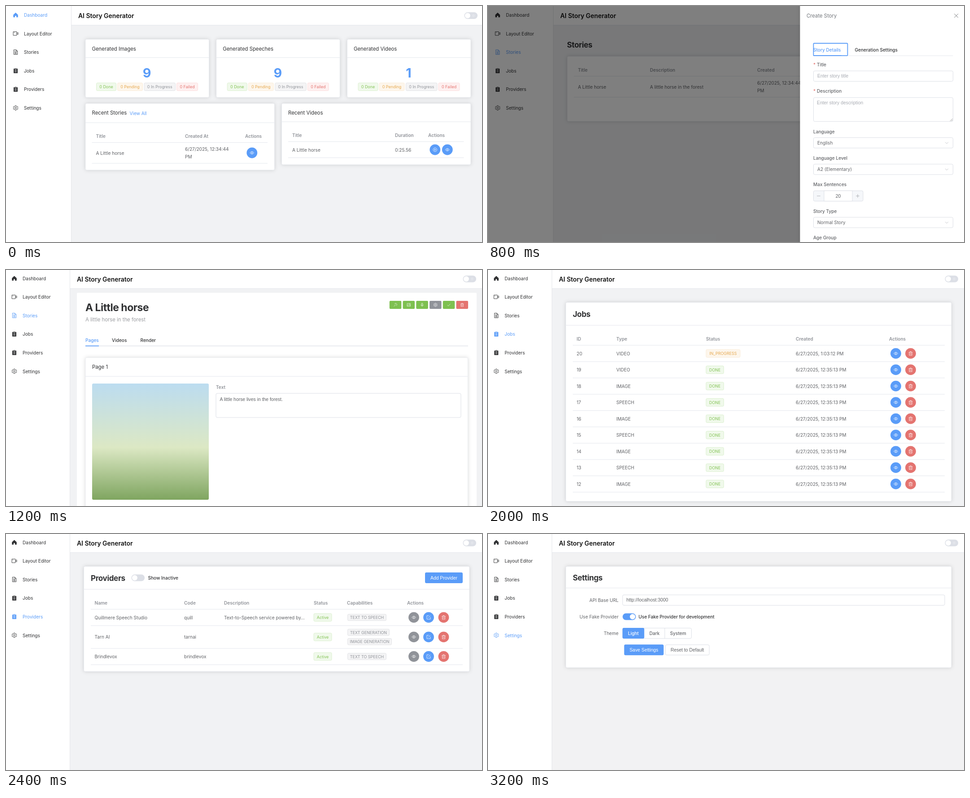
An HTML page that plays this animation: 1061x528 px, repeating every 3600 ms.

```html
<!DOCTYPE html>
<html lang="en">
<head>
<meta charset="utf-8">
<title>AI Story Generator</title>
<style>
html, body { margin: 0; width: 100%; height: 100%; overflow: hidden; background: #fff; }
svg#stage { display: block; width: 100%; height: 100%; }
.scene { visibility: hidden; animation: show 3600ms step-end infinite; }
@keyframes show { 0% { visibility: visible; } 11.1111%, 100% { visibility: hidden; } }
text { font: 10.1px Inter, sans-serif; fill: #606266; dominant-baseline: central; white-space: pre; }
.dark { fill: #303133; }
.title { font-size: 13.9px; font-weight: 600; fill: #111; }
.head { font-size: 11.35px; fill: #303133; }
.h2 { font-size: 17px; font-weight: 700; letter-spacing: -.02em; fill: #303133; }
.h1 { font-size: 22.9px; font-weight: 700; letter-spacing: -.02em; fill: #303133; }
.big { font-size: 28.8px; font-weight: 700; }
.th { font-weight: 600; fill: #909399; }
.med { font-weight: 500; }
.bold { font-weight: 700; font-size: 9.8px; fill: #111; }
.tag { font-size: 8.95px; }
.ui { font: 10.4px "Liberation Sans", Arial, sans-serif; }
.hint { fill: #a8abb2; }
.on { fill: #5a9cf8; }
.white { fill: #fff; }
.mid { text-anchor: middle; }
.end { text-anchor: end; }
.shadow { filter: drop-shadow(0 0 4.5px rgba(0,0,0,.14)); }
.icon { fill: none; stroke: currentColor; stroke-width: 1.2; stroke-linejoin: round; }
.solid { fill: currentColor; stroke: none; }
</style>
</head>
<body>
<svg id="stage" viewBox="0 0 1061 528">
  <defs>
    <linearGradient id="meadow" x2="0" y2="1">
      <stop offset="0" stop-color="#bcdcf0"/><stop offset=".55" stop-color="#dce8c4"/><stop offset="1" stop-color="#7fa560"/>
    </linearGradient>
  </defs>
</svg>
<script>
const BLUE = '#5a9cf8', GREEN = '#7ec050', RED = '#e47470', GREY = '#909399';
const LINE = '#e4e7ed', EDGE = '#dcdfe6';
const TAGS = {
  done: ['#f0f9eb', '#dcf0d0', '#84c356'],
  pending: ['#fdf6ec', '#faecd8', '#e6a950'],
  info: ['#f4f4f5', '#e2e3e6', GREY],
  failed: ['#fef0f0', '#fcdede', RED]
};
const ICONS = {
  home: '<path class="solid" d="M8 1 15 7.5V15H10V10.5H6V15H1V7.5Z"/>',
  camera: '<path d="M.8 2.5H11.2V13.5H.8ZM11.2 7 15.3 5V11L11.2 9M3 5.2H5"/>',
  doc: '<path d="M2.5 1H9.5L13.5 5V15H2.5ZM9.5 1V5H13.5M5 7.5H11M5 10H11M5 12.5H11M5 5H7"/>',
  clip: '<path class="solid" d="M2 2H5V.8H11V2H14V15.2H2Z"/><path stroke="#fff" d="M5 3.5H11M5 7.5H11M5 11H11"/>',
  gear: '<path d="M6.5 1.2H9.5L10 3.2 11.7 4.2 13.6 3.6 15.1 6.2 13.6 7.6V8.4L15.1 9.8 13.6 12.4 11.7 11.8 10 12.8 9.5 14.8H6.5L6 12.8 4.3 11.8 2.4 12.4.9 9.8 2.4 8.4V7.6L.9 6.2 2.4 3.6 4.3 4.2 6 3.2Z"/><circle cx="8" cy="8" r="2.4"/>',
  eye: '<path d="M1 8Q8-1 15 8 8 17 1 8Z"/><circle cx="8" cy="8" r="2.3"/>',
  play: '<circle cx="8" cy="8" r="6.6"/><path d="M6.4 5 11 8 6.4 11Z"/>',
  trash: '<path d="M1.5 4H14.5M6 4V1.8H10V4M3.2 4V14.5H12.8V4M6.4 7V11.5M9.6 7V11.5"/>',
  edit: '<path d="M9 2H2V14H14V7M6.5 9.5 14 2"/>',
  check: '<path d="M2 8.5 6 12.5 14 4"/>',
  tick: '<circle cx="8" cy="8" r="6.8"/><path d="M4.8 8 7.2 10.4 11.2 6"/>',
  plus: '<path d="M8 1.5V14.5M1.5 8H14.5"/>',
  minus: '<path d="M1.5 8H14.5"/>',
  save: '<path d="M8 1V11M3.5 7 8 11.3 12.5 7M2 14.5H14"/>',
  down: '<path d="M2 5 8 11 14 5"/>',
  up: '<path d="M2 11 8 5 14 11"/>',
  close: '<path d="M2 2 14 14M14 2 2 14"/>',
  picture: '<path d="M1.5 2.5H14.5V13.5H1.5ZM1.5 11.5 6 7.5 9 10.5 11.5 8.5 14.5 11"/><circle cx="10.5" cy="5.5" r="1"/>',
  mic: '<path d="M5.7 1.5H10.3V9H5.7ZM3 7.5Q3 11.8 8 11.8 13 11.8 13 7.5M8 12V15"/>',
  wand: '<path d="M2 14 9 7M5 5A4.6 4.6 0 1 1 11 11M8 1V2.5"/>',
  sun: '<circle cx="8" cy="8" r="3.4"/><path stroke-dasharray="1.5 3" d="M8 1.5A6.5 6.5 0 1 1 7.9 1.5"/>'
};

const text = (x, y, s, cls = '', fill = '') =>
  `<text x="${x}" y="${y}" class="${cls}"${fill && ` style="fill:${fill}"`}>${s}</text>`;
const box = (x, y, w, h, fill = '#fff', stroke = 'none', r = 3, extra = '') =>
  `<rect x="${x}" y="${y}" width="${w}" height="${h}" rx="${r}" fill="${fill}" stroke="${stroke}" ${extra}/>`;
const hline = (x1, x2, y, color = LINE, w = 1) => box(x1, y - w / 2, x2 - x1, w, color, 'none', 0);
const icon = (name, cx, cy, size, color) =>
  `<g class="icon" color="${color}" transform="translate(${cx - size / 2} ${cy - size / 2}) scale(${size / 16})">${ICONS[name]}</g>`;
const card = (x, y, w, h) => box(x, y, w, h, '#fff', LINE, 3, 'class="shadow" stroke-width=".7"');
const round = (name, cx, cy, fill = BLUE) =>
  `<circle cx="${cx}" cy="${cy}" r="11.9" fill="${fill}"/>` + icon(name, cx, cy, 10.4, '#fff');
const tag = (x, cy, w, kind, s, h = 17.4) => {
  const [fill, edge, ink] = TAGS[kind];
  return box(x, cy - h / 2, w, h, fill, edge, 2.5) + text(x + w / 2, cy, s, 'tag mid', ink);
};
const button = (x, y, w, h, fill, s = '') =>
  box(x, y, w, h, fill) + text(x + w / 2, y + h / 2, s, 'ui mid white');
const field = (x, y, w, h = 23.3, s = '', cls = 'ui') =>
  box(x, y, w, h, '#fff', EDGE) + text(x + 8.5, y + h / 2, s, cls);
const select = (x, y, w, s) => field(x, y, w, 23.3, s, '') + icon('down', x + w - 14, y + 11.8, 9, '#a8abb2');
const toggle = (x, cy, on) =>
  box(x, cy - 7.4, 29.6, 14.8, on ? BLUE : EDGE, 'none', 7.4) +
  `<circle cx="${x + (on ? 22.2 : 7.4)}" cy="${cy}" r="6" fill="#fff"/>`;
const heads = (y, cols) => cols.map(([x, s]) => text(x, y, s, 'th')).join('');
const lines = (x1, x2, ys) => ys.map(y => hline(x1, x2, y)).join('');

const NAV = [['home', 'Dashboard'], ['camera', 'Layout Editor'], ['doc', 'Stories'],
             ['clip', 'Jobs'], ['clip', 'Providers'], ['gear', 'Settings']];

function shell(active, shifted, back = '#f1f2f4') {
  const dx = shifted ? -3 : 0, dy = shifted ? -1.5 : 0;
  const nav = NAV.map(([name, label], i) => {
    const y = 20 + i * 41.6, on = label === active;
    return icon(name, 21.5, y, 12, on ? BLUE : '#303133') + text(40, y, label, on ? 'on' : 'dark');
  }).join('');
  return box(0, 0, 1061, 528, back, 'none', 0) + `<g transform="translate(${dx} ${dy})">` +
    box(-5, -5, 150, 540, '#fff', 'none', 0) + box(145, -5, 925, 47.5, '#fff', 'none', 0) +
    box(145, -5, 1, 540, '#e3e5e9', 'none', 0) + hline(146, 1070, 43, LINE) + nav +
    text(161, 22, 'AI Story Generator', 'title') + toggle(1021.5, 21.5) +
    icon('sun', 1042, 21.5, 8, '#f3f4f6') + '</g>';
}

function dashboard() {
  const stats = [['Images', 9], ['Speeches', 9], ['Videos', 1]].map(([name, n], i) =>
    `<g transform="translate(${i * 291.75} 0)">` + card(177, 74.5, 275.5, 130) +
    text(191.5, 95.5, 'Generated ' + name, 'head') + hline(177, 452.5, 115.5) +
    text(314, 149, n, 'big mid on') + tag(201.5, 180.7, 44, 'done', '0 Done') +
    tag(248.5, 180.7, 56, 'pending', '0 Pending') + tag(308, 180.7, 69.5, 'info', '0 In Progress') +
    tag(380.5, 180.7, 47, 'failed', '0 Failed') + '</g>').join('');
  return shell('Dashboard') + stats +
    card(177, 218, 421.5, 149) + text(191.5, 239, 'Recent Stories', 'head') +
    text(275.5, 239.5, 'View All', 'on') + hline(177, 598.5, 261) +
    heads(290.5, [[200.5, 'Title'], [399, 'Created At'], [533, 'Actions']]) + lines(191.5, 583, [305.5, 352]) +
    text(200.5, 328.7, 'A Little horse') + text(399, 320.3, '6/27/2025, 12:34:44') + text(399, 337.3, 'PM') +
    round('eye', 548.3, 328.5) +
    card(614.5, 218, 421.5, 137) + text(629, 239, 'Recent Videos', 'head') + hline(614.5, 1036, 259) +
    heads(288.7, [[638, 'Title'], [867, 'Duration'], [941, 'Actions']]) + lines(629, 1020.5, [303.5, 339.5]) +
    text(638, 321.7, 'A Little horse') + text(867, 321.7, '0:25.56') +
    round('play', 956.3, 321.5) + round('eye', 983.8, 321.5);
}

function layoutEditor() {
  const stepper = (y, label, n) => text(185.5, y, label) + field(185.5, y + 14.3, 173.5) +
    box(335, y + 14.3, 24, 23.3, '#f5f7fa', EDGE) + hline(335, 359, y + 26, EDGE) +
    icon('up', 347, y + 20.5, 7, GREY) + icon('down', 347, y + 31.5, 7, GREY) +
    text(262, y + 26, n, 'ui mid');
  const corners = [[699.7, 125.7], [966.7, 125.7], [699.7, 430], [966.7, 430]]
    .map(([x, y]) => box(x - 3, y - 3, 6, 6, BLUE, 'none', 0)).join('');
  return shell('Layout Editor') + box(161, 58.5, 890, 480, '#fafbfb', 'none', 2) +
    select(176, 72.3, 163, 'Side-by-Side Layout') +
    button(781, 72, 102.5, 24, RED) + icon('trash', 798, 84, 10.4, '#fff') + text(807.5, 84, 'Delete Layout', 'ui white') +
    button(887, 72, 88, 24, BLUE) + icon('plus', 903.3, 84, 9, '#fff') + text(909, 84, 'New Layout', 'ui white') +
    button(979, 72, 57.5, 24, GREEN) + icon('save', 995.3, 84, 9, '#fff') + text(1000.5, 84, 'Save', 'ui white') +
    hline(169, 1043, 101.8) + box(168.5, 110.5, 207.5, 440, '#fff', LINE) +
    '<path d="M178.5 110.5V125Q178.5 127.5 181 127.5H364Q366.5 127.5 366.5 125V110.5Z" fill="#f4f6f8" stroke="#dcdfe6"/>' +
    icon('picture', 192, 114.5, 11.5, '#303133') + text(204, 114.7, 'Image', 'head') +
    text(178.3, 153.7, 'Properties', 'bold" style="font-size:11.5px') +
    box(178, 166, 188, 90, '#fcfcfd') + box(178, 267, 188, 270, '#fcfcfd') +
    text(185.5, 181.7, 'Layout Properties', 'bold') + text(185.5, 203, 'Layout Name') +
    field(185.5, 217.2, 173.5, 23.3, 'Side-by-Side Layout') +
    text(185.5, 284.7, 'Item Properties (text)', 'bold') + box(304, 275.7, 55, 17.8, RED, 'none', 2.5) +
    icon('trash', 317.3, 284.7, 9, '#fff') + text(324, 284.7, 'Delete', 'ui white" style="font-size:9px') +
    hline(185.5, 359, 301) + stepper(321, 'Position X', 420) + stepper(376, 'Position Y', 20) +
    text(185.5, 431, 'Text Content') + field(185.5, 445, 173.5, 23.3, 'Sample Text') + text(185.5, 486, 'Text Color') +
    box(186, 500, 23, 23, '#fff', LINE) + box(190, 504, 15, 15, '#333', 'none', 1) + icon('down', 197.5, 511.7, 7, '#fff') +
    box(388, 110.5, 594, 430, '#f1f2f4', 'none', 0) + box(388, 110.5, 594, 334.5, '#eeeff1', '#e2e3e5', 0, 'class="shadow"') +
    box(388.5, 111, 296.5, 333.5, '#dedede', '#b0b0b0', 0) +
    box(528, 273, 17.5, 11, '#3d3d3f', 'none', 1.5) + box(533, 271, 7, 4, '#55565a', 'none', 1) +
    box(528, 274.5, 17.5, 1.2, '#8b8c8e', 'none', 0) +
    '<circle cx="537" cy="279" r="4" fill="#222" stroke="#777"/><circle cx="537" cy="279" r="1.6" fill="#596170"/>' +
    box(698.4, 124.4, 269.8, 307.2, '#f2f3f5', BLUE, 0, 'stroke-width="1.8"') + corners +
    text(699.5, 134.7, 'Sample Text', 'ui" style="font-size:13px;fill:#444');
}

function createStory() {
  const need = (y, s) => text(725, y, '*', 'med', RED) + text(733, y, s, 'med');
  return shell('Stories') + text(176, 86.5, 'Stories', 'h2') + card(176.5, 112.5, 860, 145.5) +
    heads(142.5, [[200.5, 'Title'], [361, 'Description'], [600, 'Created']]) + lines(191.5, 1020, [157, 204]) +
    text(200.5, 180.7, 'A Little horse') + text(361, 180.7, 'A little horse in the forest') +
    text(600, 172.3, '6/27/2025, 12:34:44') + text(600, 189.3, 'PM') +
    box(0, 0, 1061, 528, 'rgba(0,0,0,.5)', 'none', 0) +
    box(695.5, -20, 390, 570, '#fff', 'none', 0, 'class="shadow"') +
    text(710, 22, 'Create Story', 'head', '#72767b') + icon('close', 1043.7, 21.7, 11.5, '#606266') +
    hline(725, 1036.5, 111.2) + hline(725, 787.5, 110.8, BLUE, 1.6) +
    box(725.5, 83.5, 76, 27.7, 'none', BLUE, 1.5, 'stroke-width="1.8"') +
    text(725, 98, 'Story Details', 'med on') + text(817.5, 98, 'Generation Settings', 'med dark') +
    need(131, 'Title') + field(725.5, 145.2, 311, 23.3, 'Enter story title', 'ui hint') +
    need(190.3, 'Description') + box(725.5, 204.8, 311, 53.5, '#fff', EDGE) +
    text(733, 216, 'Enter story description', 'ui hint') +
    '<path d="M1030 257.5 1035.5 252M1033 257.5 1035.5 255" stroke="#888" stroke-width=".8"/>' +
    text(725, 280.5, 'Language', 'med') + select(725.5, 294.5, 311, 'English') +
    text(725, 339.7, 'Language Level', 'med') + select(725.5, 353.8, 311, 'A2 (Elementary)') +
    text(725, 399, 'Max Sentences', 'med') + box(725.5, 413.3, 110.5, 23.3, '#f5f7fa', EDGE) +
    box(749, 413.3, 63, 23.3, '#fff', EDGE, 0) + icon('minus', 737, 425, 9.5, GREY) +
    text(780.5, 425, 20, 'ui mid') + icon('plus', 824, 425, 9.5, GREY) +
    text(725, 458.5, 'Story Type', 'med') + select(725.5, 472.7, 311, 'Normal Story') +
    text(725, 518, 'Age Group', 'med');
}

function story(tab, content) {
  const tools = [['wand', GREEN], ['picture', GREEN], ['mic', GREEN], ['gear', GREY], ['check', GREEN], ['trash', RED]];
  const tabs = [['Pages', 177, 30], ['Videos', 236, 33.5], ['Render', 299.5, 35]];
  return shell('Stories', true) + box(158, 51, 891, 490, '#fff', 'none', 2) +
    text(177, 84.3, 'A Little horse', 'h1') + text(177, 111, 'A little horse in the forest', 'head', '#999b9f') +
    tools.map(([name, fill], i) => box(854.8 + i * 29.75, 69, 26.5, 18, fill, 'none', 2) +
      icon(name, 868 + i * 29.75, 78, 9, '#fff')).join('') +
    hline(177, 1030, 169.8, LINE, 1.6) +
    tabs.map(([s, x, w]) => text(x, 156.7, s, 'med ' + (s === tab ? 'on' : 'dark')) +
      (s === tab ? hline(x, x + w, 169.8, BLUE, 1.7) : '')).join('') + content;
}

const pages = () => story('Pages',
  card(177, 196, 852.5, 345) + text(192, 217, 'Page 1', 'head') + hline(177, 1029.5, 238) +
  box(192, 254, 260, 260, 'url(#meadow)', 'none', 3) +
  text(468, 262, 'Text', 'th') + box(468, 276, 546, 54, '#fff', EDGE) +
  text(476.5, 289, 'A little horse lives in the forest.', 'ui'));

function videos() {
  const row = (y, id, kind, status, w, done, fill, length, date) =>
    text(201, y, id) + tag(275.5, y, w, kind, status) + box(387, y - 2.4, 258.5, 4.6, '#ebedf0', 'none', 2.3) +
    box(387, y - 2.4, 258.5 * done, 4.6, fill, 'none', 2.3) + text(704, y, length) + text(778.5, y, date) +
    round('play', 927.5, y) + round('trash', 961, y, RED);
  return story('Videos', card(177, 196, 852.5, 172) + text(192, 224.3, 'Generated Videos', 'h2') +
    button(918, 211.5, 96.5, 24, '#88b8fa', 'Generate Video') +
    heads(265, [[201, 'ID'], [275.5, 'Status'], [387, 'Progress'], [704, 'Duration'], [778.5, 'Created'], [912, 'Actions']]) +
    lines(192, 1014, [279.5, 316, 352]) +
    row(298, 2, 'pending', 'IN_PROGRESS', 76, .277, BLUE, 'N/A', '6/27/2025, 1:03:12 PM') + text(649.5, 298, '28%') +
    row(334.4, 1, 'done', 'DONE', 39.5, 1, GREEN, '0:25.56', '6/27/2025, 12:35:13 PM') +
    icon('tick', 654.5, 334.4, 10.4, GREEN));
}

function jobs() {
  const rows = Array.from({ length: 9 }, (_, i) => {
    const y = 186.7 + i * 36.5, type = i < 2 ? 'VIDEO' : i % 2 ? 'SPEECH' : 'IMAGE';
    return text(197.5, y, 20 - i) + text(286, y, type) +
      (i ? tag(486, y, 39.5, 'done', 'DONE') : tag(486, y, 76, 'pending', 'IN_PROGRESS')) +
      text(686, y, i ? '6/27/2025, 12:35:13 PM' : '6/27/2025, 1:03:12 PM') +
      round('eye', 909, y) + round('trash', 942, y, RED) + hline(189, 1018, y + 18.3);
  }).join('');
  return shell('Jobs', true) + card(173.5, 72.5, 859.5, 445) + text(189, 98.7, 'Jobs', 'h2') + hline(173.5, 1033, 123.7) +
    heads(153.7, [[197.5, 'ID'], [286, 'Type'], [486, 'Status'], [686, 'Created'], [894, 'Actions']]) +
    hline(189, 1018, 168.3) + rows;
}

function providers() {
  const row = (y, name, code, about, caps) => text(197.5, y, name) + text(397, y, code) + text(486, y, about) +
    tag(686, y, 40, 'done', 'Active') +
    caps.map(([s, w], i) => tag(761.5, y + (i - (caps.length - 1) / 2) * 20.8, w, 'info', s, 14.4)).join('') +
    round('eye', 909, y, GREY) + round('edit', 942, y) + round('trash', 975.5, y, RED);
  const speech = ['TEXT TO SPEECH', 86];
  return shell('Providers', true) + card(173.5, 72.5, 859.5, 235) + text(189, 98.7, 'Providers', 'h2') +
    toggle(279.5, 98) + text(316.5, 98, 'Show Inactive', 'med dark') + button(934, 86, 84, 24, BLUE, 'Add Provider') +
    hline(173.5, 1033, 123.7) +
    heads(153.7, [[197.5, 'Name'], [397, 'Code'], [486, 'Description'], [686, 'Status'], [760, 'Capabilities'], [894, 'Actions']]) +
    lines(189, 1018, [168.3, 205, 256, 292.5]) +
    row(186.6, 'Quillmere Speech Studio', 'quill', 'Text-to-Speech service powered by…', [speech]) +
    row(230.4, 'Tarn AI', 'tarnai', '', [['TEXT GENERATION', 93], ['IMAGE GENERATION', 98]]) +
    row(274, 'Brindlevox', 'brindlevox', '', [speech]);
}

function providerDetails() {
  const row = (y, label, value) => text(291, y, label, 'end') + field(300, y - 11.7, 718, 23.3, value);
  return shell('Providers', true) + card(173.5, 72.5, 859.5, 445) + text(189, 98.7, 'Tarn AI', 'h2') +
    hline(173.5, 1033, 123.7) + row(153, 'Name', 'Tarn AI') + row(190, 'Code', 'tarnai') + row(227, 'Description', '') +
    text(291, 264, 'Status', 'end') + tag(300, 264, 40, 'done', 'Active') +
    text(291, 301, 'Capabilities', 'end') + tag(300, 301, 93, 'info', 'TEXT GENERATION', 14.4) +
    tag(398, 301, 98, 'info', 'IMAGE GENERATION', 14.4) +
    heads(344, [[197.5, 'Capability'], [486, 'Model'], [894, 'Actions']]) + lines(189, 1018, [358.5, 395, 431.5]) +
    text(197.5, 376.8, 'Text Generation') + text(197.5, 413.2, 'Image Generation') +
    round('edit', 909, 376.8) + round('edit', 909, 413.2);
}

function settings() {
  const label = (y, s) => text(291, y, s, 'end');
  return shell('Settings', true, '#f2f2f3') + card(173.5, 72.5, 859.5, 226.5) + text(189, 97.5, 'Settings', 'h2') +
    hline(173.5, 1033, 120.8) + label(148.2, 'API Base URL') + field(300, 136.2, 718, 23.3, 'http://localhost:3000') +
    label(185, 'Use Fake Provider') + toggle(300, 185, true) + text(335.5, 185, 'Use Fake Provider for development', 'med dark') +
    label(222.3, 'Theme') + box(300, 210.5, 153.5, 23.3, '#fff', EDGE) + box(299.8, 210, 48.5, 24, BLUE) +
    box(393.5, 210.5, 1, 23.3, EDGE, 'none', 0) + text(324, 222.3, 'Light', 'med mid white') +
    text(371, 222.3, 'Dark', 'med mid') + text(423.7, 222.3, 'System', 'med mid') +
    button(303.5, 247.3, 88, 24, BLUE, 'Save Settings') + box(395.5, 247.8, 97.7, 23, '#fff', EDGE) +
    text(444.2, 259.3, 'Reset to Default', 'ui mid');
}

const scenes = [dashboard, layoutEditor, createStory, pages, videos, jobs, providers, providerDetails, settings];
document.getElementById('stage').insertAdjacentHTML('beforeend', scenes.map((draw, i) =>
  `<g class="scene" style="animation-delay:${i ? i * 400 - 3600 : 0}ms">${draw()}</g>`).join(''));
</script>
</body>
</html>
```
